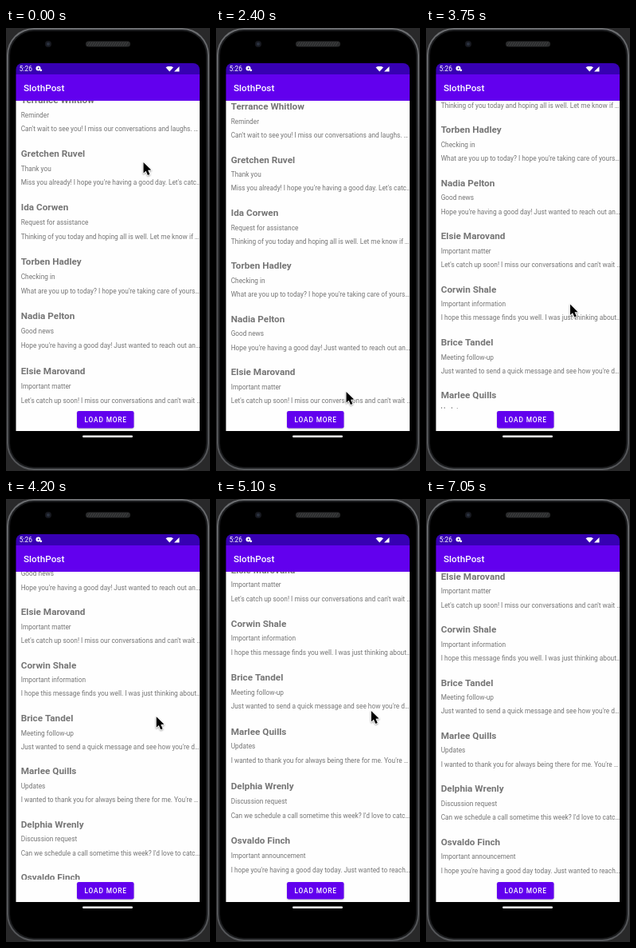
Write an HTML page with a canvas that moves like this. It is 256 by 554 pixels and loops after 7350 ms.

```html
<!DOCTYPE html>
<html lang="en">
<head>
<meta charset="utf-8">
<title>Mail list</title>
<style>
  html, body { margin: 0; width: 100%; height: 100%; overflow: hidden; background: #29292a; }
  canvas { display: block; width: 256px; height: 554px; }
</style>
</head>
<body>
<canvas id="stage"></canvas>
<script>
const LOOP = 7350, STEP = 150;
const LIST_TOP = 91, LIST_BOTTOM = 476, ROW_HEIGHT = 66.4;
const GREY = '#757575', PURPLE = '#6200ee';

const mails = [
  ['Terrance Whitlow', 'Reminder', "Can't wait to see you! I miss our conversations and laughs. …"],
  ['Gretchen Ruvel', 'Thank you', "Miss you already! I hope you're having a good day. Let's catc…"],
  ['Ida Corwen', 'Request for assistance', 'Thinking of you today and hoping all is well. Let me know if …'],
  ['Torben Hadley', 'Checking in', "What are you up to today? I hope you're taking care of yours…"],
  ['Nadia Pelton', 'Good news', "Hope you're having a good day! Just wanted to reach out an…"],
  ['Elsie Marovand', 'Important matter', "Let's catch up soon! I miss our conversations and can't wait …"],
  ['Corwin Shale', 'Important information', 'I hope this message finds you well. I was just thinking about…'],
  ['Brice Tandel', 'Meeting follow-up', "Just wanted to send a quick message and see how you're d…"],
  ['Marlee Quills', 'Updates', "I wanted to thank you for always being there for me. You're …"],
  ['Delphia Wrenly', 'Discussion request', "Can we schedule a call sometime this week? I'd love to catc…"],
  ['Osvaldo Finch', 'Important announcement', "I hope you're having a good day today. Just wanted to reach…"]
];

const canvas = document.getElementById('stage');
const ctx = canvas.getContext('2d');
const ratio = window.devicePixelRatio || 1;
canvas.width = 256 * ratio;
canvas.height = 554 * ratio;
ctx.scale(ratio, ratio);

// Smooth progress from 0 to 1 between two times.
function ease(time, start, end) {
  const k = Math.min(1, Math.max(0, (time - start) / (end - start)));
  return k * k * (3 - 2 * k);
}

const pulse = (time, start, peak, end) => ease(time, start, peak) - ease(time, peak, end);

// Two swipes carry the list from its first page to its end.
const scrollAt = time => 170 * ease(time, 2850, 3600) + 163.5 * ease(time, 3750, 4435);

const stretchAt = time => 8 * (1 - ease(time, 0, 450))
  + 8 * pulse(time, 4650, 5100, 5400)
  + 6 * pulse(time, 5550, 5700, 6000);

function pointerAt(time) {
  let x = 172, y = 167;
  const glide = (start, end, toX, toY) => {
    const k = ease(time, start, end);
    x += (toX - x) * k;
    y += (toY - y) * k;
  };
  glide(0, 900, 126, 482);      // to the button
  glide(1950, 2400, 163, 454);  // back onto the list
  glide(2550, 3450, 161, 234);  // first swipe
  glide(3450, 3850, 184, 365);
  glide(3850, 4400, 190, 231);  // second swipe
  glide(4400, 4750, 196, 322);
  glide(4750, 5400, 193, 218);  // pull past the end
  glide(6150, 7050, 201, 572);  // off the stage
  return [x, y];
}

function box(x, y, w, h, radius, fill) {
  ctx.beginPath();
  ctx.roundRect(x, y, w, h, radius);
  ctx.fillStyle = fill;
  ctx.fill();
}

function disc(x, y, r, fill) {
  ctx.beginPath();
  ctx.arc(x, y, r, 0, Math.PI * 2);
  ctx.fillStyle = fill;
  ctx.fill();
}

function polygon(points, fill) {
  ctx.beginPath();
  points.forEach(([x, y]) => ctx.lineTo(x, y));
  ctx.closePath();
  ctx.fillStyle = fill;
  ctx.fill();
}

function text(string, x, y, size, weight, fill, spacing = 0) {
  ctx.font = `${weight} ${size}px Roboto, sans-serif`;
  ctx.letterSpacing = spacing + 'px';
  ctx.fillStyle = fill;
  ctx.fillText(string, x, y);
}

function drawPhone() {
  const metal = ctx.createLinearGradient(0, 0, 0, 554);
  ['#6c6e71', '#48494c', '#48494c', '#56585b'].forEach((tone, i) => metal.addColorStop(i / 3, tone));
  box(0, 0, 256, 554, 0, '#29292a');
  box(1, 0, 254, 553, 34, metal);
  box(3, 2, 250, 549, 32, '#1b1c1e');
  box(5, 4, 246, 545, 30, '#000');
  disc(53, 20, 4, '#17191f');
  disc(53, 20, 2, '#2b3240');

  box(100, 16.5, 56, 7, 3.5, '#2a2b2c');
  ctx.strokeStyle = '#48494b';
  ctx.lineWidth = 0.8;
  ctx.beginPath();
  for (let x = 102; x < 152; x += 3) {
    ctx.moveTo(x, 22.5);
    ctx.lineTo(x + 3, 17.5);
  }
  ctx.stroke();

  box(12.5, 44, 230.5, 14, [8, 8, 0, 0], '#3700b3');
  box(12.5, 58, 230.5, 33, 0, PURPLE);
  box(12.5, LIST_TOP, 230.5, 413, 0, '#fefefe');
  box(96, 509.5, 63, 2.5, 1.25, '#fff');
  text('5:26', 16.7, 54, 8.4, 400, '#fff');
  disc(40.5, 50.5, 3, '#fff');
  disc(40.7, 50.5, 0.9, '#3700b3');
  disc(43.8, 52.8, 1.4, '#fff');
  polygon([[200.5, 49.2], [203, 48], [207.5, 48], [210, 49.2], [205.2, 54.5]], '#fff');
  polygon([[211, 54.5], [217.5, 54.5], [217.5, 48]], '#fff');
  text('SlothPost', 22, 79, 11.75, 500, '#fff');
}

function drawList(scroll, stretch) {
  ctx.save();
  ctx.beginPath();
  ctx.rect(12.5, LIST_TOP, 230.5, LIST_BOTTOM - LIST_TOP);
  ctx.clip();
  // Overscroll lifts the rows most at the top and not at all at the bottom edge.
  const stretched = y => {
    const depth = Math.min(1, Math.max(0, (y - LIST_TOP) / (LIST_BOTTOM - LIST_TOP)));
    return y - stretch * (1 - depth ** 1.8);
  };
  mails.forEach(([name, subject, body], i) => {
    const y = 102.2 + i * ROW_HEIGHT - scroll;
    text(name, 18.7, stretched(y), 11.75, 700, GREY);
    text(subject, 18.7, stretched(y + 17.5), 8.3, 400, GREY);
    text(body, 18.7, stretched(y + 34.8), 8.3, 400, GREY);
  });
  ctx.restore();
}

function drawButton(time) {
  ctx.save();
  ctx.shadowColor = 'rgba(0, 0, 0, .22)';
  ctx.shadowBlur = 2 * ratio;
  ctx.shadowOffsetY = ratio;
  box(89, 479, 71.5, 21.5, 2.3, PURPLE);
  ctx.restore();

  const age = time - 1200;
  if (age >= 0 && age < 900) {
    ctx.save();
    ctx.beginPath();
    ctx.roundRect(89, 479, 71.5, 21.5, 2.3);
    ctx.clip();
    const opacity = 0.24 * (1 - ease(age, 400, 900));
    disc(126, 484, 12 + age * 0.12, `rgba(255, 255, 255, ${opacity})`);
    ctx.restore();
  }
  text('LOAD MORE', 98.5, 492.8, 8.3, 500, '#fff', 0.85);
}

function drawPointer(x, y) {
  ctx.save();
  ctx.translate(x + 0.5, y + 1);
  ctx.shadowColor = 'rgba(0, 0, 0, .3)';
  ctx.shadowBlur = 2 * ratio;
  ctx.shadowOffsetY = ratio;
  const arrow = [[0, 0], [0, 13.5], [3.1, 10.7], [5.4, 16], [7.9, 14.9], [5.6, 9.8], [9.7, 9.6]];
  polygon(arrow, '#000');
  ctx.strokeStyle = '#fff';
  ctx.lineWidth = 1.8;
  ctx.lineJoin = 'round';
  ctx.stroke();
  ctx.shadowColor = 'transparent';
  polygon(arrow, '#000');
  ctx.restore();
}

function draw() {
  const time = Math.floor((performance.now() % LOOP) / STEP) * STEP;
  drawPhone();
  drawList(scrollAt(time), stretchAt(time));
  drawButton(time);
  drawPointer(...pointerAt(time));
  requestAnimationFrame(draw);
}
draw();
</script>
</body>
</html>
```
